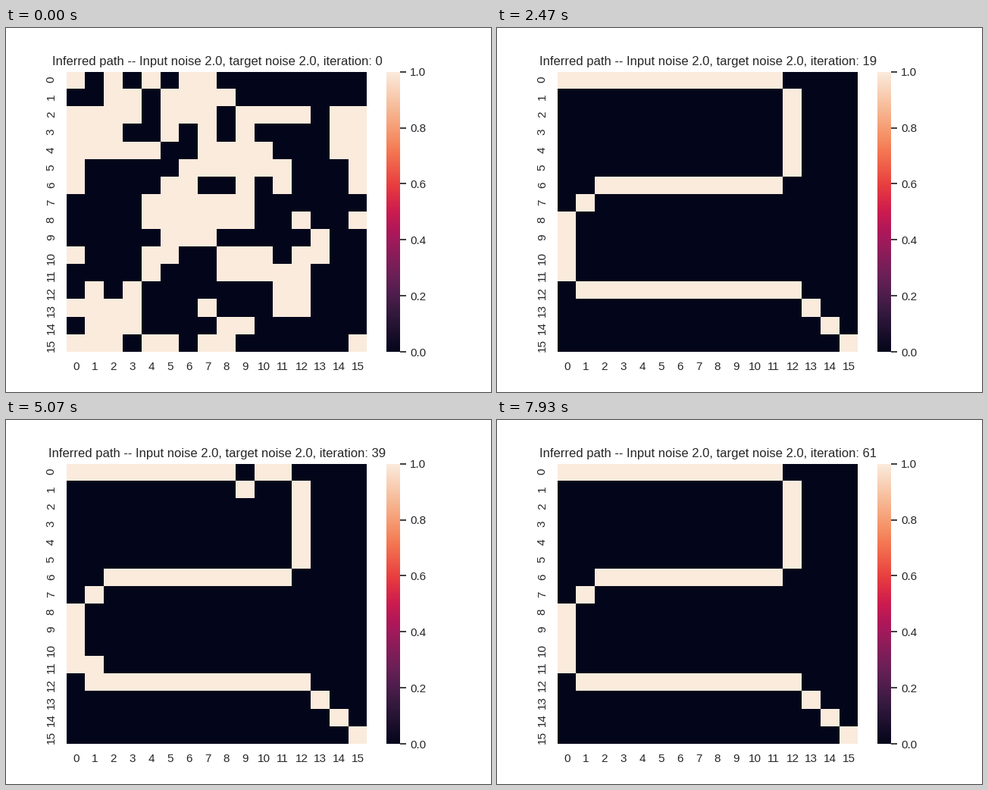
These frames come from a looping animation (640 px wide and 480 px high, 8 s). A matplotlib script:

```python
import matplotlib.pyplot as plt
import numpy as np
from matplotlib.animation import FuncAnimation
from matplotlib.colors import LinearSegmentedColormap
from matplotlib.transforms import Affine2D

N = 16
LOOP_MS, TICK_MS, STEP_MS, LAST = 8000, 40, 130, 61
INK = "0.15"
SURGES = 13, 46  # iterations at which the right side gets unsettled

plt.rcParams.update({
    "font.family": "Liberation Sans",
    "font.size": 12, "axes.titlesize": 12,
    "xtick.labelsize": 11, "ytick.labelsize": 11,
    "text.color": INK, "xtick.color": INK, "ytick.color": INK,
    "xtick.major.size": 6, "ytick.major.size": 6,
    "xtick.major.width": 1.25, "ytick.major.width": 1.25,
})

ROCKET = LinearSegmentedColormap.from_list("rocket", [
    (0, "#03051a"), (1 / 7, "#35193e"), (0.2, "#4c1d4b"), (0.25, "#611f53"),
    (2 / 7, "#701f57"), (0.4, "#a11a5b"), (3 / 7, "#ad1759"), (0.5, "#cb1b4f"),
    (4 / 7, "#e13342"), (0.6, "#e83f3f"), (5 / 7, "#f37651"), (0.75, "#f4875e"),
    (0.8, "#f69c73"), (6 / 7, "#f6b48f"), (1, "#faebdd")])


def trace(*corners):
    """Cells (row, col) on straight and diagonal lines through the corners."""
    cells = [corners[0]]
    for (r0, c0), (r1, c1) in zip(corners, corners[1:]):
        n = max(abs(r1 - r0), abs(c1 - c0))
        cells += [(r0 + (r1 - r0) * i // n, c0 + (c1 - c0) * i // n)
                  for i in range(1, n + 1)]
    return cells


ROUTE = trace((0, 0), (0, 11), (1, 12), (5, 12), (6, 11), (6, 2),
              (8, 0), (11, 0), (12, 1), (12, 12), (15, 15))
ROWS, COLS = np.indices((N, N))


def clumps(rng):
    """Gaussian noise that leans on its upper and left neighbours."""
    field = rng.normal(size=(N, N))
    return field + 0.6 * (np.roll(field, 1, 0) + np.roll(field, 1, 1))


def belief(k):
    """Grid at iteration k: noise recedes rightwards while the route emerges."""
    rng = np.random.default_rng(k)
    field = clumps(rng)
    grid = (field > 0.2 + 0.1 * k) & (COLS >= 1.6 * k)

    gap = min(abs(k - s) for s in SURGES)
    unsettled = (COLS >= 10) & (ROWS >= 5) & (ROWS <= 13)
    grid |= unsettled & (field > 0.9 + (gap / 3) ** 2)

    for r, c in ROUTE[:int(4.6 * k)]:
        grid[r, c] = True
        # Horizontal runs bulge, or step aside, by one row
        if r % 6 == 0 and rng.random() < 0.08:
            grid[abs(r + rng.choice([-1, 1])), c] = True
            grid[r, c] = rng.random() < 0.6
    return grid.astype(float)


fig, ax = plt.subplots(figsize=(6.4, 4.8), dpi=100)
# The small shift makes cell edges snap to the pixel above and to the left
mesh = ax.pcolormesh(belief(0), cmap=ROCKET, vmin=0, vmax=1,
                     transform=Affine2D().translate(0, 0) + ax.transData
                     + Affine2D().translate(-0.45, 0.45))
ax.set(xlim=(0, N), ylim=(N, 0))
centres = np.arange(N) + 0.5
ax.set_xticks(centres, range(N))
ax.set_yticks(centres, range(N), rotation="vertical")
ax.tick_params(bottom=False, left=False)
ax.spines[:].set_visible(False)
title = ax.set_title("")

bar = fig.colorbar(mesh, ax=ax)
bar.outline.set_linewidth(0)


def draw(i):
    k = min((i * TICK_MS + TICK_MS - 10) // STEP_MS, LAST)
    mesh.set_array(belief(k))
    title.set_text("Inferred path -- Input noise 2.0, target noise 2.0, "
                   f"iteration: {k}")
    return mesh, title


anim = FuncAnimation(fig, draw, frames=LOOP_MS // TICK_MS, interval=TICK_MS,
                     repeat=True, repeat_delay=0, cache_frame_data=False)
plt.show()
```
